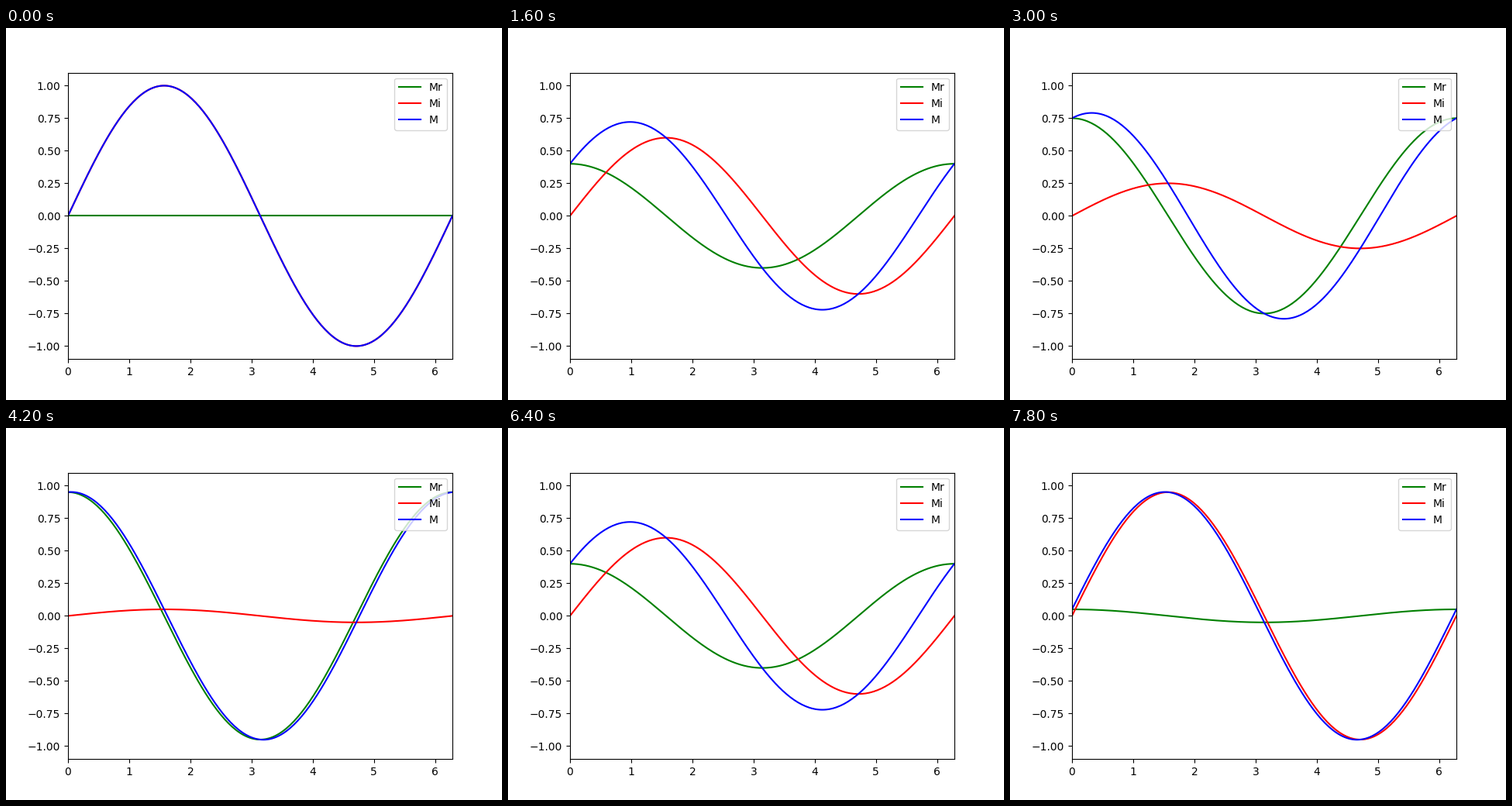
These frames come from a looping animation (640x480 px, 8 s). A matplotlib script:

```python
import numpy as np
import matplotlib.pyplot as plt
from matplotlib.animation import FuncAnimation

FRAMES = 40
INTERVAL = 200

x = np.linspace(0, 2 * np.pi, 200)

fig, ax = plt.subplots(figsize=(6.4, 4.8), dpi=100)
ax.set_xlim(0, 2 * np.pi)
ax.set_ylim(-1.1, 1.1)

real_line, = ax.plot([], [], color="green", label="Mr")
imag_line, = ax.plot([], [], color="red", label="Mi")
sum_line, = ax.plot([], [], color="blue", label="M")
ax.legend(loc="upper right")


def update(frame):
    # The cosine weight rises linearly to 1 at mid-loop, then falls back.
    weight = 1 - abs(1 - 2 * frame / FRAMES)
    real = weight * np.cos(x)
    imag = (1 - weight) * np.sin(x)
    real_line.set_data(x, real)
    imag_line.set_data(x, imag)
    sum_line.set_data(x, real + imag)
    return real_line, imag_line, sum_line


anim = FuncAnimation(fig, update, frames=FRAMES, interval=INTERVAL,
                     repeat=True, repeat_delay=0, blit=False)
plt.show()
```
